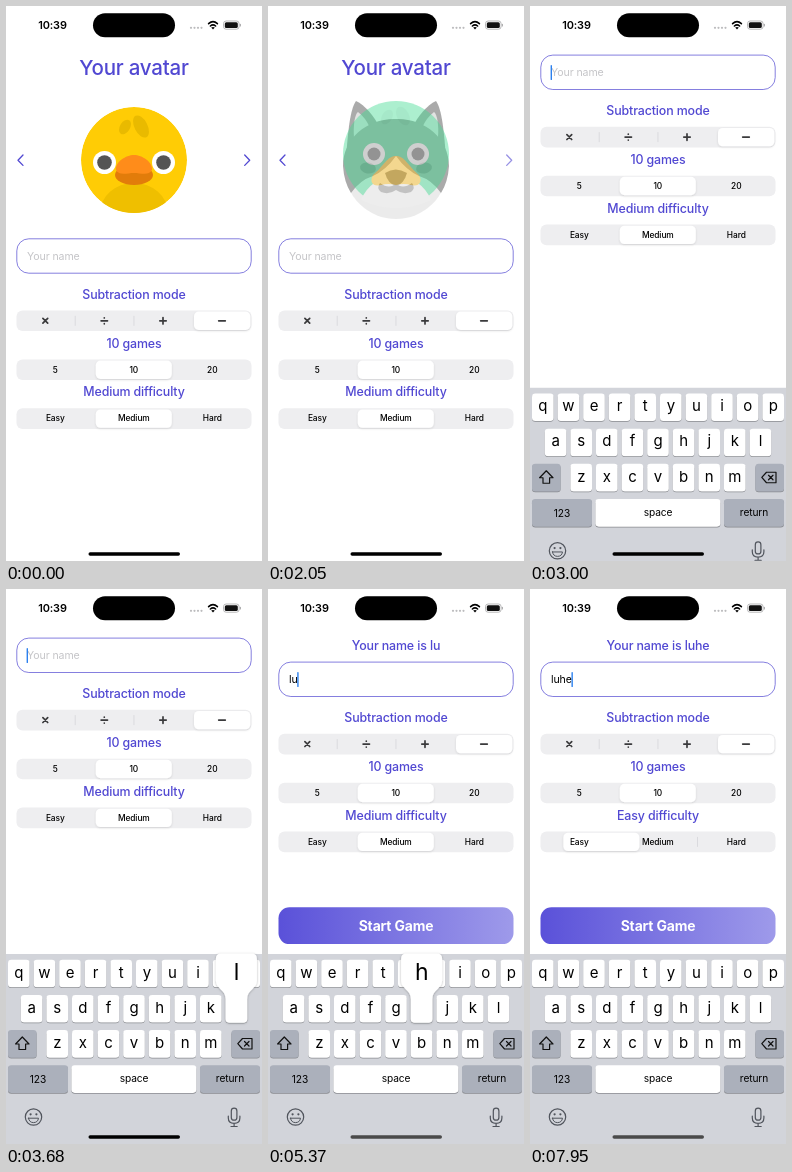
An HTML page that plays this animation: 256 by 555 pixels, repeating every 8000 ms.

```html
<!DOCTYPE html>
<html lang="en">
<head>
<meta charset="utf-8">
<title>Avatar setup</title>
<style>
html, body { margin: 0; width: 100%; height: 100%; overflow: hidden; background: #fff }
svg { display: block; width: 256px; height: 555px }
text { font-family: Inter, sans-serif; letter-spacing: -.01em; text-anchor: middle; dominant-baseline: central }
.label { font-size: 12.4px; font-weight: 500; fill: #5148d2 }
.left { text-anchor: start; font-size: 10.6px }
</style>
</head>
<body>
<svg id="stage" viewBox="0 0 256 555"></svg>
<script>
const LOOP = 8000, NAME = 'luhe', VIOLET = '#5148d2';
const $ = id => document.getElementById(id);
const set = (id, attrs) => { for (const k in attrs) $(id).setAttribute(k, attrs[k]); };
const clamp = x => Math.min(1, Math.max(0, x));
const ease = x => { x = clamp(x); return x * x * (3 - 2 * x); };
const spring = x => x <= 0 ? 0 : 1 - (1 + x) * Math.exp(-x);

// Shape helpers
const text = (s, x, y, size, attrs = '') => `<text x="${x}" y="${y}" font-size="${size}" ${attrs}>${s}</text>`;
const label = (s, y, id = '') => `<text class="label" id="${id}" x="128" y="${y}">${s}</text>`;
const rect = (x, y, w, h, r, fill, attrs = '') =>
  `<rect x="${x}" y="${y}" width="${w}" height="${h}" rx="${r}" fill="${fill}" ${attrs}/>`;
const oval = (x, y, rx, ry, fill, turn = 0) =>
  `<ellipse cx="${x}" cy="${y}" rx="${rx}" ry="${ry}" fill="${fill}" transform="rotate(${turn} ${x} ${y})"/>`;
const disc = (x, y, r, fill) => oval(x, y, r, r, fill);
const area = (d, fill) => `<path d="${d}" fill="${fill}"/>`;
const line = (d, color, w) =>
  `<path d="${d}" fill="none" stroke="${color}" stroke-width="${w}" stroke-linecap="round" stroke-linejoin="round"/>`;
// Draws a part on the left and its mirror image on the right
const pair = part => part + `<g transform="matrix(-1 0 0 1 256 0)">${part}</g>`;
const eyes = (x, y, r, pupil, color = '#545454') => pair(disc(x, y, r, '#fff') + disc(x, y, pupil, color));
const round = s => `<g clip-path="url(#face)">${s}</g>`;

const avatars = [
  // chick
  round(disc(128, 154, 53, '#ffcc05') + oval(128, 207, 34, 30, '#efbf00')) +
    oval(119, 121, 5, 8, '#e9ba00', 32) + oval(135, 120.5, 6.5, 12, '#e9ba00', -27) +
    eyes(98.5, 156.5, 11.5, 7.3) + oval(128, 169, 19, 10, '#e27c0a') +
    area('M110 164C109 156 120 149 128 149S147 156 146 164C143 170 135 167 128 167S113 170 110 164Z', '#ff8c1a'),
  // chicken
  round(disc(128, 155, 53, '#f0f0f0')) +
    pair(area('M128 98C120 95 108 97 108 108V130C108 142 116 148 128 148Z', '#e8562f')) +
    pair(disc(98.5, 162, 7.3, '#4a4a4a')) +
    pair(area('M128 186C120 180 111 184 113 192S122 202 128 199Z', '#dd3030')) +
    oval(128, 168, 19, 15, '#ff9410'),
  // cow
  round(oval(128, 154, 47, 53, '#e6e6e6')) +
    pair(area('M123 98C113 97 106 100 102 103C92 94 78 95 75 101C75 111 78 120 83 125Q78 148 80 168Q83 180 91 190L104 186Q108 165 117 150Z', '#545454') +
      area('M95 105C90 100 81 99 79 104C79 112 82 118 87 121Z', '#f8c0f2')) +
    eyes(104, 133.5, 8.5, 5.5, '#666') + disc(128, 181, 27.5, '#ffb4fb') + pair(oval(118, 170, 5, 6, '#d77ac5')),
  // crocodile
  pair(disc(100, 119, 17, '#58c86b')) + round(disc(128, 158, 51, '#58c86b')) + eyes(100, 119, 11, 7) +
    oval(128, 178, 42, 27, '#78dc83') + pair(disc(113, 165, 4, '#3c994d')) + line('M94 183Q128 199 162 183', '#3c994d', 3),
  // dog
  oval(128, 163, 51, 50, '#ddd') +
    pair(area('M78 152C80 126 82 103 88 95C97 99 106 110 112 122Z', '#686868') +
      area('M86 132C85 118 87 108 90 106Q98 112 102 122Z', '#ccc') +
      area('M128 113C100 112 75 132 75 160Q76 176 83 187Q92 174 105 170Q118 164 128 150Z', '#686868') +
      oval(100, 162, 8, 5.5, '#333', 10) +
      area('M128 177Q122 184 112 177Q108 182 113 186Q121 189 128 184Z', '#555')) +
    area('M117 167Q127.5 160 139 167Q136 178 128 180Q120 178 117 167Z', '#444'),
  // duck
  disc(128, 148, 53, '#43dc93') +
    oval(119, 111, 5, 8, '#37cd85', 32) + oval(135, 110, 6, 10, '#37cd85', -27) +
    area('M93 194Q102 172 128 170Q154 172 163 194Q128 210 93 194Z', '#f0f0f0') +
    eyes(106, 148, 11, 6.5, '#777') +
    pair(area('M128 150C119 150 116 160 105 169C101 176 105 181 113 179Q120 177 128 179Z', '#ffbf1b'))
];
const taps = [-9999, 1080, 1300, 1500, 1700, 1890, 99999];

// Segmented controls
const thumb = (x, y, w, id = '') => rect(x, y - 9.2, w, 18.4, 4.8, '#fff', `id="${id}" filter="url(#soft)"`);
const track = y => rect(10.5, y - 10.3, 235, 20.6, 6, '#eeeef0');
const split = (x, y, attrs = '') => rect(x, y - 5, .7, 10, 0, '#d2d2d6', attrs);
const options = (words, y) => words.map((s, i) =>
  text(s, 49.3 + 78.5 * i, y - .2, 8.4, 'font-weight="500"')).join('');
const sign = (d, x, y) => `<g transform="translate(${x} ${y})">${line(d, '#3a3a3c', 1.7)}</g>`;

// Keyboard
const rows = ['qwertyuiop', 'asdfghjkl', 'zxcvbnm'];
const keyAt = c => {
  const r = rows.findIndex(s => s.includes(c));
  return [[12.8, 25.6, 51.2][r] + 25.6 * rows[r].indexOf(c), 384.5 + 35.2 * r];
};
const cap = (x, y, w, fill) => rect(x, y - 13, w, 27.6, 3.3, '#898b90') + rect(x, y - 13.8, w, 27.6, 3.3, fill);
const letterKey = c => {
  const [x, y] = keyAt(c);
  return cap(x - 10.8, y, 21.6, '#fff') + text(c, x, y - 1.5, 15);
};
const GREY = '#50545c';
const keyboard = rect(0, 365, 256, 200, 0, '#d2d4da') + [...rows.join('')].map(letterKey).join('') +
  cap(2, 454.9, 28.6, '#abb0bb') + cap(225.4, 454.9, 28.6, '#abb0bb') +
  line('M16.3 448L9.6 455H13V460.5H19.6V455H23Z', '#111', 1.2) +
  line('M236.5 449.5H246V460H236.5L231.8 454.7ZM238.5 452.5L243 457M243 452.5L238.5 457', '#111', 1.2) +
  cap(2, 490.1, 60, '#abb0bb') + cap(65.4, 490.1, 125, '#fff') + cap(194, 490.1, 60, '#abb0bb') +
  text('123', 32, 490, 10.2) + text('space', 128, 489.3, 10.2) + text('return', 224, 489.3, 10.2) +
  '<circle cx="27.5" cy="528" r="8.2" fill="none" stroke="#50545c" stroke-width="1.2"/>' +
  disc(24.6, 525.3, 1.1, GREY) + disc(30.4, 525.3, 1.1, GREY) +
  line('M22.5 529.2H32.5Q31.8 533.6 27.5 533.6T22.5 529.2Z', GREY, 1) +
  '<rect x="225.3" y="519.2" width="5.6" height="12" rx="2.8" fill="none" stroke="#50545c" stroke-width="1.2"/>' +
  line('M222.3 527V529Q222.3 534.3 228.1 534.3T233.9 529V527M228.1 534.3V537.5M225 537.5H231.2', GREY, 1.2);

const bubble = 'M-16-55H16Q20.5-55 20.5-50V-28C20.5-20 10.8-19 10.8-10V10Q10.8 14 7 14H-7' +
  'Q-10.8 14-10.8 10V-10C-10.8-19-20.5-20-20.5-28V-50Q-20.5-55-16-55Z';
// Key down, key up and the moment the letter lands
const strokes = [[3680, 3880, 3880], [4200, 4320, 4270], [5370, 5470, 5420], [5950, 6150, 6060]];

$('stage').innerHTML = `
<defs>
  <clipPath id="face"><circle cx="128" cy="154" r="53"/></clipPath>
  <linearGradient id="fade"><stop stop-color="#5a51d9"/><stop offset="1" stop-color="#9e9aea"/></linearGradient>
  <filter id="soft" x="-20%" y="-30%" width="140%" height="180%">
    <feDropShadow dx="0" dy="1" stdDeviation="1.2" flood-opacity=".12"/></filter>
  <filter id="lift" x="-30%" y="-20%" width="160%" height="140%">
    <feDropShadow dx="0" dy=".5" stdDeviation="1.2" flood-opacity=".3"/></filter>
</defs>
${rect(0, 0, 256, 555, 0, '#fff')}
<g id="top">
  ${text('Your avatar', 128, 61.8, 20.5, `font-weight="500" fill="${VIOLET}"`)}
  ${avatars.map((a, i) => `<g id="avatar${i}">${a}</g>`).join('')}
  ${line('M17 149L12 154.2L17 159.4', VIOLET, 1.3)}
  <g id="next">${line('M238.7 149L243.7 154.2L238.7 159.4', VIOLET, 1.3)}</g>
</g>
${label('', 57, 'greeting')}
<g id="form">
  <rect x="10.8" y="-17.2" width="234.4" height="34.4" rx="12" fill="#fff" stroke="${VIOLET}" stroke-width=".7"/>
  <text class="left" id="hint" x="21" y="0" fill="#c5c5c8">Your name</text>
  <text class="left" id="entry" x="21" y="0"></text>
  ${rect(21, -7.2, 1.4, 15, .7, '#2c80ee', 'id="caret"')}
  ${label('Subtraction mode', 38)}
  ${track(64.8)}${split(68.8, 64.8)}${split(127.6, 64.8)}${thumb(188, 64.8, 56.3)}
  ${sign('M-2.4-2.4L2.4 2.4M2.4-2.4L-2.4 2.4', 39.3, 64.8)}
  ${sign('M-3.2 0H3.2M0-3V-2.9M0 2.9V3', 98.3, 64.8)}
  ${sign('M-3.2 0H3.2M0-3.2V3.2', 157, 64.8)}
  ${sign('M-3.3 0H3.3', 216, 64.8)}
  ${label('10 games', 87)}
  ${track(113.7)}${thumb(89.8, 113.7, 76)}${options(['5', '10', '20'], 113.7)}
  ${label('', 135.9, 'level')}
  ${track(162.6)}${split(167, 162.6, 'id="split"')}${thumb(89.8, 162.6, 76, 'slider')}
  ${options(['Easy', 'Medium', 'Hard'], 162.6)}
</g>
<g id="start">
  ${rect(10.5, 318.3, 235, 36.8, 11, 'url(#fade)')}
  ${text('Start Game', 128, 336.7, 13.9, 'font-weight="700" fill="#fff"')}
</g>
<g id="keyboard">${keyboard}</g>
<g id="popup" filter="url(#lift)">${area(bubble, '#fff')}${text('', 0, -37, 23, 'id="pressed"')}</g>
${rect(82.5, 546.3, 91.5, 3.4, 1.7, '#000', 'id="home"')}
${text('10:39', 46.5, 19.1, 10.9, 'font-weight="600"')}
${rect(87, 7.3, 82, 24, 12, '#000')}
${[0, 1, 2, 3].map(i => disc(185 + 3.5 * i, 21.8, 1.1, '#bcbcbe')).join('')}
${line('M202.6 17.6Q207 13.6 211.4 17.6M204.4 20Q207 17.8 209.6 20', '#000', 1.6)}
${area('M205.2 21.6Q207 20.3 208.8 21.6L207 23.6Z', '#000')}
<rect x="217.5" y="15" width="15.6" height="8.2" rx="2.6" fill="none" stroke="#a6a6a8" stroke-width=".8"/>
${rect(218.8, 16.3, 13, 5.6, 1.5, '#111')}${rect(233.9, 17.7, 1, 2.8, .5, '#a6a6a8')}`;

let typed = null;
function type(s) {
  if (s === typed) return;
  typed = s;
  $('entry').textContent = s;
  $('greeting').textContent = s && 'Your name is ' + s;
  set('hint', { opacity: s ? 0 : 1 });
  set('caret', { x: 20.6 + (s ? $('entry').getComputedTextLength() : 0) });
}

function draw(t) {
  avatars.forEach((_, i) => set('avatar' + i, {
    opacity: ease((t - taps[i]) / 350) * (1 - ease((t - taps[i + 1]) / 350))
  }));
  set('next', { opacity: 1 - .4 * ease((t - 1080) / 60) * (1 - ease((t - 2130) / 200)) });

  // Focusing the field brings up the keyboard; the first letter opens the rest
  const focus = ease((t - 2725) / 260), opened = ease((t - 3880) / 400);
  set('top', { opacity: 1 - focus });
  set('form', { transform: `translate(0 ${250 - 183.7 * focus + 24 * opened})` });
  set('greeting', { y: 40.5 + 16 * opened, opacity: clamp(opened * 1.6) });
  set('start', { opacity: opened });
  set('keyboard', { transform: `translate(0 ${190 * (1 - spring((t - 2720) * .0144))})` });
  const tone = Math.round(74 * opened);
  set('home', { fill: `rgb(${tone},${tone},${tone})` });

  type(NAME.slice(0, strokes.filter(s => t >= s[2]).length));
  const blink = ease((t - 7020) / 140) * (1 - ease((t - 7390) / 140));
  set('caret', { opacity: t < 2740 ? 0 : 1 - blink });

  const down = strokes.findIndex(s => t >= s[0] && t < s[1]);
  set('popup', { visibility: down < 0 ? 'hidden' : 'visible' });
  if (down >= 0) {
    $('pressed').textContent = NAME[down];
    set('popup', { transform: `translate(${keyAt(NAME[down])})` });
  }

  const easy = t >= 7840;
  $('level').textContent = (easy ? 'Easy' : 'Medium') + ' difficulty';
  set('split', { opacity: easy ? 1 : 0 });
  set('slider', { x: 89.8 - 78.3 * spring((t - 7810) * .018) });
}

const begin = performance.now();
function tick() {
  draw((performance.now() - begin) % LOOP);
  requestAnimationFrame(tick);
}
tick();
</script>
</body>
</html>
```
